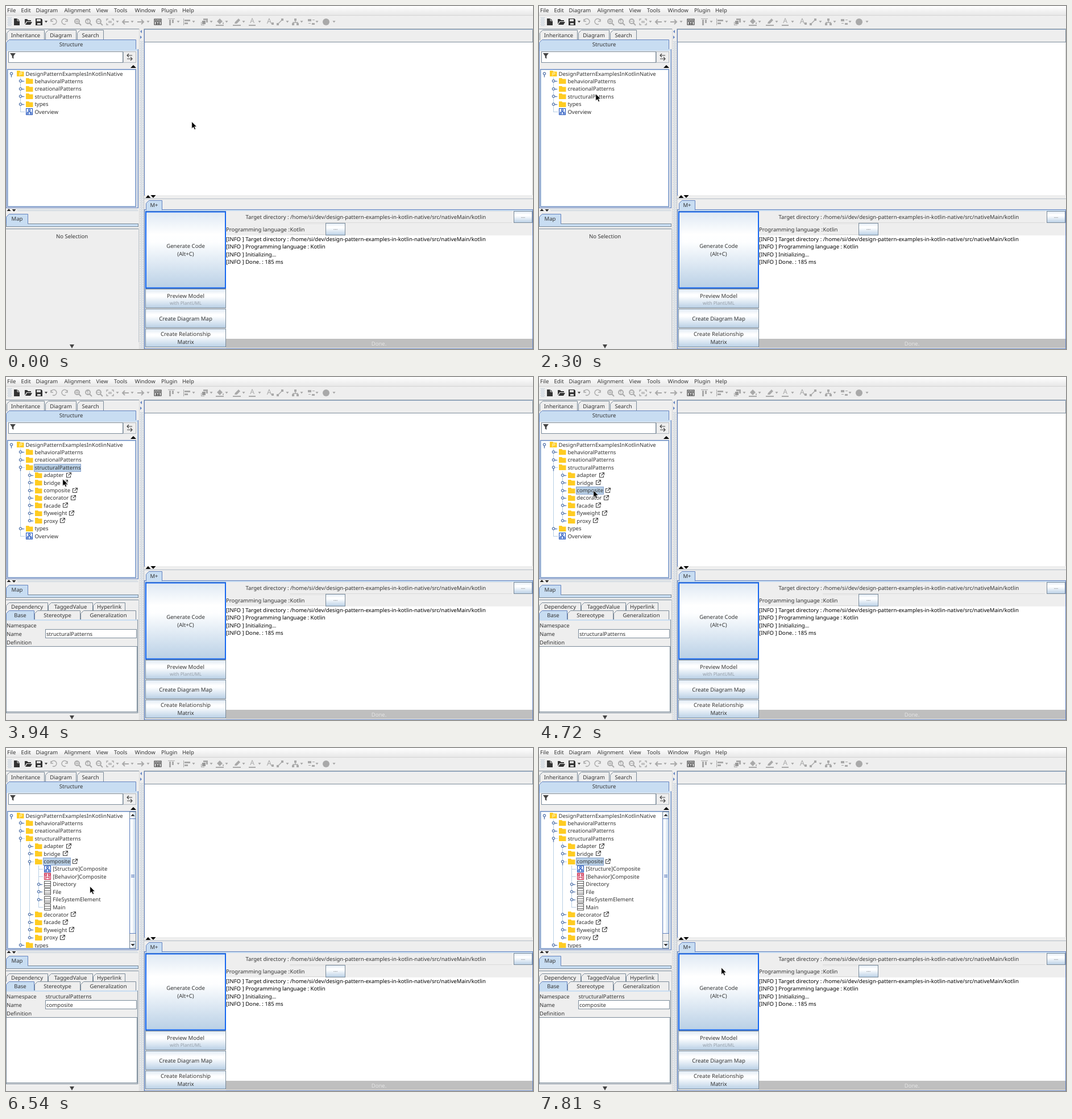
Write an HTML page with a canvas that moves like this. It is 927 by 604 pixels and loops after 8 s.

```html
<!DOCTYPE html>
<html>
<head>
<meta charset="utf-8">
<style>
html, body { margin: 0; height: 100%; overflow: hidden; background: #eee; }
canvas { display: block; }
</style>
</head>
<body>
<canvas id="c" width="927" height="604"></canvas>
<script>
const g = document.getElementById('c').getContext('2d');
const INK = '#333', EDGE = '#7a8a99', BLUE = '#6382bf', TAB = '#c8ddf2', SEL = '#b8cfe5', OFF = '#a9a9a9';
const ROW = 13.42, LOOP = 8000;

function rect(x, y, w, h, fill, edge) {
  if (fill) { g.fillStyle = fill; g.fillRect(x, y, w, h); }
  if (edge) { g.strokeStyle = edge; g.strokeRect(x + .5, y + .5, w - 1, h - 1); }
}
function text(s, x, mid, color = INK, align = 'left', size = 9.55) {
  g.font = size + 'px "Noto Sans", "Open Sans", sans-serif';
  g.textRendering = 'geometricPrecision';
  g.textAlign = align;
  g.fillStyle = color;
  g.fillText(s, x, mid + 3.5);
}
function shape(x, y, d, fill, edge, width = 1) {
  const p = new Path2D(d);
  g.save();
  g.translate(x, y);
  if (fill) { g.fillStyle = fill; g.fill(p); }
  if (edge) { g.strokeStyle = edge; g.lineWidth = width; g.stroke(p); }
  g.restore();
}
function sheen(x, y, w, h, edge = EDGE, across) {
  const q = across ? g.createLinearGradient(x, 0, x + w, 0) : g.createLinearGradient(0, y, 0, y + h);
  q.addColorStop(0, '#dde8f3');
  q.addColorStop(.3, '#fff');
  q.addColorStop(.4, '#fdfeff');
  q.addColorStop(1, SEL);
  rect(x, y, w, h, q, edge);
}
function button(label, x, y, w, h, edge) {
  sheen(x, y, w, h, edge);
  const lines = label.split('\n');
  lines.forEach((s, i) => text(s, x + w / 2, y + h / 2 + (i - (lines.length - 1) / 2) * 13.4, INK, 'center', 9.65));
}
function tab(label, x, y, w, h, on) {
  shape(x + .5, y + .5, `M0 ${h}V5L5 0H${w - 1}V${h}`, on ? TAB : '#eee', on ? BLUE : EDGE);
  text(label, x + w / 2, y + h / 2 + .3, INK, 'center');
}
const tri = (x, y, w, h, c = '#000') => shape(x, y, `M${-w / 2} 0H${w / 2}L0 ${h}z`, c);

function bumps(x, y, w, h) {
  for (let j = 0; j < h; j += 2)
    for (let i = j % 4 / 2; i < w; i += 2) {
      if ((i * 2 + j) % 4 === 0) rect(x + i, y + j, 1, 1, '#a3b8cc');
    }
}

function menuAndTools() {
  const m = g.createLinearGradient(0, 0, 0, 17);
  m.addColorStop(0, '#fff');
  m.addColorStop(1, '#e6e6e6');
  rect(0, 0, 927, 16, m);
  [['File', 2], ['Edit', 26.5], ['Diagram', 52.5], ['Alignment', 102.5], ['View', 158.5], ['Tools', 190],
   ['Window', 226.5], ['Plugin', 273], ['Help', 310]].forEach(([s, x]) => text(s, x, 7.7));
  rect(0, 16, 927, 1, '#d4d4d4');
  bumps(3, 20, 7, 16);

  const y = 28, fill = (x, d, c = OFF) => shape(x, y, d, c), line = (x, d, c = OFF, w = 1.4) => shape(x, y, d, 0, c, w);
  fill(19, 'M-5-6H1L5-2V6H-5z', INK);
  line(19, 'M1-6V-2H5', '#eee', 1);
  fill(39, 'M-6-5H-2L0-3H5V-1H-3L-6 4zM-2 0H7L4 5H-5z', INK);
  fill(58, 'M-6-6H4L6-4V6H-6z', INK);
  fill(58, 'M-4-5H3V-1H-4zM-3 2H3V5H-3z', '#ddd');
  line(84, 'M-5-5V-1H-1M-5-1A5 5 0 1 1-2 4');
  line(103, 'M5-5V-1H1M5-1A5 5 0 1 0 2 4');
  ['M-4-1H2M-1-4V2', 'M-3-2L-1-4V2', 'M-4-1H2'].forEach((d, i) => {
    line(126 + 19 * i, 'M3-1A4 4 0 1 1-5-1A4 4 0 1 1 3-1M2 2L6 6', OFF, 1.8);
    line(126 + 19 * i, d, OFF, 1);
  });
  line(183, 'M-6-2V-5H-3M3-5H6V-2M6 2V5H3M-3 5H-6V2');
  fill(183, 'M-3-2H3V2H-3z', '#c4c4c4');
  line(210, 'M6 0H-5M-1-4L-5 0L-1 4', OFF, 2);
  line(237, 'M-6 0H5M1-4L5 0L1 4', OFF, 2);
  line(267, 'M-6-5H6V5H-6zM-4-3H-1V0H-4zM1-3H4V0H1zM-4 3H4M-2 0V5M2 0V5', INK, 1.1);
  fill(291, 'M-6-6H6V-5H-6zM-4-4H-1V6H-4zM1-4H4V2H1z');
  fill(318, 'M-6-6H-5V6H-6zM-4-4H6V-1H-4zM-4 1H2V4H-4z');
  fill(349, 'M-2-6H6V1H3V-3H-2z');
  fill(349, 'M-4-2H2V4H-4z', '#999');
  fill(349, 'M-6 0H-5V5H0V6H-6z');
  fill(376, 'M-5-1L0-6L5-1L0 4zM6 0Q8 4 6 4Q4 4 6 0zM-7 5H7V7H-7z');
  fill(406, 'M-4 3L-3 0L3-6L6-3L0 3zM-7 5H7V7H-7z');
  text('A', 433, 26.5, OFF, 'center', 12);
  fill(433, 'M-6 5H6V7H-6z');
  text('A', 463, 27.5, OFF, 'center', 13);
  fill(468, 'M-1 1H3V5H-1z');
  line(482, 'M-4 4L4-4');
  fill(482, 'M-6 2H-2V6H-6zM2-6H6V-2H2z');
  line(509, 'M0-3V1M-4 3V1H4V3');
  fill(509, 'M-2-6H2V-2H-2zM-6 2H-2V6H-6zM2 2H6V6H2z');
  fill(537, 'M-6-5H0V-1H-6zM1 2H6V5H1zM-5 2H-1V3H-5zM2-4H6V-3H2z');
  shape(563, 28, 'M6 0A6 6 0 1 1-6 0A6 6 0 1 1 6 0', OFF);
  [70.5, 196, 222, 250, 303, 330, 361, 388, 418, 446, 495, 520, 547, 577].forEach((x, i) => tri(x, 26, 5, 3.5, i ? OFF : '#444'));
}

function frames() {
  rect(0, 40, 234, 1, EDGE);
  tab('Inheritance', 1, 42, 67, 18);
  tab('Diagram', 69, 42, 55, 18);
  tab('Search', 125, 42, 47, 18);
  rect(0, 76, 233, 280, '#eee', BLUE);
  tab('Structure', 0, 59, 229, 17, true);
  rect(1, 76, 231, 3, TAB);
  rect(231, 77, 1, 278, SEL);
  rect(4, 80, 202, 20, '#fff', EDGE);
  shape(12, 88, 'M-5-5H5L1.3 0V5L-1.3 3V0z', '#444');
  rect(206, 80, 23, 20, '#eee', '#b0b8c0');
  shape(217, 90, 'M5-3H-4M-1-6L-4-3L-1 0M-4 3H5M2 0L5 3L2 6', 0, '#444', 1.2);
  tri(224, 109, 10, -5);
  rect(2, 111, 227, 243, '#fff', BLUE);
  rect(3, 112, 225, 241, 0, SEL);

  bumps(20, 358, 212, 4);
  tri(5, 361, 7, -4, '#222');
  tri(14, 358, 7, 4, '#222');
  rect(0, 383, 233, 6, TAB, EDGE);
  tab('Map', 0, 366, 39, 17, true);
  rect(1, 383, 37, 2, TAB);
  rect(0, 392, 234, 1, EDGE);
  rect(233, 392, 1, 200, '#c4ccd4');
  tri(116, 596, 8, 7, '#444');

  rect(234, 40, 1, 564, '#d8d8d8');
  rect(242, 40, 1, 564, '#b4bcc6');
  bumps(236, 62, 5, 542);
  shape(236, 45, 'M3-3V3L0 0z', BLUE);
  shape(236, 55, 'M0-3V3L3 0z', BLUE);

  rect(243, 40, 684, 24, '#eee', EDGE);
  rect(243, 41, 684, 1, '#a9bdd6');
  rect(243, 64, 684, 269, '#fff');
  rect(243, 41, 1, 293, BLUE);
  rect(926, 64, 1, 269, '#ccc');
  tri(250, 338, 9, -5);
  tri(259, 333, 9, 5);
  rect(243, 339, 684, 1, '#b4bcc6');
}

function plugin() {
  rect(243, 358, 684, 246, '#eee', BLUE);
  rect(244, 359, 682, 2, TAB);
  rect(244, 359, 1, 244, TAB);
  tab('M+', 246, 342, 29, 17, true);
  rect(247, 359, 27, 2, TAB);
  button('Generate Code\n(Alt+C)', 245, 361, 142, 137, EDGE);
  g.lineWidth = 2;
  g.strokeStyle = '#1466f0';
  g.strokeRect(246, 362.5, 140, 134);
  g.lineWidth = 1;
  button('', 245, 498, 142, 34);
  text('Preview Model', 316, 510, INK, 'center', 9.65);
  text('with PlantUML', 316, 522, '#929ba5', 'center', 8.2);
  button('Create Diagram Map', 245, 533, 142, 34);
  button('Create Relationship\nMatrix', 245, 568, 142, 33);

  const path = '/home/si/dev/design-pattern-examples-in-kotlin-native/src/nativeMain/kotlin';
  rect(499, 361, 391, 1, '#e2e2e2');
  rect(499, 381, 391, 1, '#dadada');
  rect(499, 383, 62, 1, '#e2e2e2');
  rect(499, 402, 62, 1, '#dadada');
  text('Target directory :', 421.5, 371.4);
  text(path, 500, 371.4);
  text('Programming language :', 387, 393);
  text('Kotlin', 499.5, 393);
  sheen(893, 361, 33, 21);
  sheen(562, 382, 35, 22);
  text('...', 909.5, 369.5, '#777', 'center');
  text('...', 579.5, 390.5, '#777', 'center');
  rect(387, 404, 539, 182, '#fff');
  ['Target directory : ' + path, 'Programming language : Kotlin', 'Initializing...', 'Done. : 185 ms']
    .forEach((s, i) => text('[INFO ] ' + s, 387, 410.4 + 13.4 * i, '#000'));
  rect(387, 586, 539, 16, '#bfbfbf');
  text('Done.', 656, 594, '#e4e4e4', 'center');
}

function properties(space, name) {
  if (!name) return text('No Selection', 116, 405, INK, 'center');
  rect(0, 427, 232, 165, '#eee', EDGE);
  tab('Dependency', 0, 397, 74, 14);
  tab('TaggedValue', 74, 397, 79, 14);
  tab('Hyperlink', 153, 397, 57, 14);
  tab('Base', 0, 411, 50, 16, true);
  tab('Stereotype', 50, 411, 81, 16);
  tab('Generalization', 131, 411, 98, 16);
  rect(1, 427, 230, 2, TAB);
  text('Namespace', 1, 437);
  text(space, 69.5, 437);
  text('Name', 1, 452.3);
  rect(69, 444, 161, 16, '#fff', EDGE);
  text(name, 71, 452.3);
  text('Definition', 1, 467.3);
  rect(0, 474, 231, 116, '#fff', EDGE);
}

const ICONS = {
  folder(x, y) { shape(x, y, 'M0-5H5L6.5-3.5H12.5V5H0z', '#fc2'); },
  root(x, y) {
    ICONS.folder(x, y);
    shape(x, y, 'M5-1.5H9V1H5zM5 1V4', 0, '#fff4c0');
  },
  chart(x, y) {
    rect(x, y - 6, 12, 12, '#e8f0ff', '#1c4fb8');
    shape(x + 6, y, 'M-1.5-4H1.5V-1.5H-1.5zM0-1.5V.5M-3 2V.5H3V2M-4 2H-1.5V4H-4zM1.5 2H4V4H1.5z', 0, '#1c4fb8');
  },
  sequence(x, y) {
    rect(x, y - 6, 12, 12, '#fde8ee', '#c2183e');
    shape(x + 6, y, 'M-4-4H-1.5V-1.5H-4zM1.5-4H4V-1.5H1.5zM-3-1V5M3-1V5M-3 1.5H3', 0, '#c2183e');
  },
  class(x, y) {
    rect(x, y - 6, 12, 12, '#fff', '#555');
    rect(x, y - 2, 12, 1, '#555');
    rect(x, y + 2, 12, 1, '#555');
  }
};

// Each row: label, depth, icon, handle (0 none, 1 closed, 2 open), link mark
function treeRows(t) {
  const open = t >= 3060, deep = t >= 5140, dir = s => [s, 2, 'folder', 1, 1];
  const rows = [['DesignPatternExamplesInKotlinNative', 0, 'root', 2], ['behavioralPatterns', 1, 'folder', 1],
    ['creationalPatterns', 1, 'folder', 1], ['structuralPatterns', 1, 'folder', open ? 2 : 1]];
  if (open) {
    rows.push(dir('adapter'), dir('bridge'), ['composite', 2, 'folder', deep ? 2 : 1, 1]);
    if (deep) rows.push(['[Structure]Composite', 3, 'chart', 0], ['[Behavior]Composite', 3, 'sequence', 0],
      ['Directory', 3, 'class', 1], ['File', 3, 'class', 1], ['FileSystemElement', 3, 'class', 1], ['Main', 3, 'class', 0]);
    rows.push(...['decorator', 'facade', 'flyweight', 'proxy'].map(dir));
  }
  rows.push(['types', 1, 'folder', 1], ['Overview', 1, 'chart', 0]);
  return rows;
}

function tree(t) {
  const rows = treeRows(t), picked = t >= 4720 ? 'composite' : t >= 2830 ? 'structuralPatterns' : '';
  const rowY = i => 119 + ROW * i, knobX = d => 9.5 + 16 * d;
  g.save();
  g.beginPath();
  g.rect(3, 112, 225, 240);
  g.clip();
  rows.forEach(([, d], i) => {
    if (!d) return;
    let up = i - 1;
    while (rows[up][1] > d) up--;
    const y = Math.round(rowY(i)), top = Math.round(rowY(up)) + (rows[up][1] < d ? 7 : 0);
    rect(knobX(d) - .5, top, 1, y - top, SEL);
    rect(knobX(d) - .5, y, 8, 1, SEL);
  });
  rows.forEach(([label, depth, icon, knob, link], i) => {
    const mid = rowY(i), y = Math.round(mid), x = 34.5 + 15.9 * depth, k = knobX(depth);
    if (knob) {
      shape(k, y + .5, knob === 2 ? 'M0 1V6' : 'M1 0H6', 0, '#5878ad', 1.4);
      shape(k, y, 'M2.1 0A2.1 2.1 0 1 1-2.1 0A2.1 2.1 0 1 1 2.1 0', '#fff', '#5878ad', 1.3);
    }
    ICONS[icon](Math.round(x - 15.6), y);
    g.font = '9.55px "Noto Sans", "Open Sans", sans-serif';
    const w = g.measureText(label).width;
    if (label === picked) rect(Math.round(x - 1), Math.round(mid - 6.7), Math.round(w + 2), 14, SEL, BLUE + '88');
    text(label, x, mid);
    if (link) shape(Math.round(x + w + 4) + .5, y - .5, 'M3-3H0V4H7V1M4-4H8V0M8-4L3 1', 0, '#444', 1.1);
  });
  g.restore();
  if (t < 5140) return;
  rect(217, 112, 12, 241, '#eee', EDGE);
  sheen(217, 112, 12, 13, EDGE, true);
  sheen(217, 340, 12, 13, EDGE, true);
  sheen(217, 124, 12, 203, BLUE, true);
  tri(223, 120, 7, -4, INK);
  tri(223, 345, 7, 4, INK);
  for (let i = 0; i < 3; i++) rect(220, 223 + 2 * i, 6, 1, BLUE);
}

// Pointer path: time, x, y; it advances once every 80 ms
const PATH = [[920, 326, 203], [1640, 189, 182], [1800, 158, 172], [2280, 99, 154], [3540, 99, 154],
  [3940, 99, 179], [4420, 95, 199], [6050, 95, 199], [6530, 147, 243], [6930, 205, 299], [7810, 320, 386]];
function pointer(t) {
  const start = [6130, 3620, 1000, 0].find(s => t >= s);
  const s = start ? start + Math.floor((t - start) / 80) * 80 : 0;
  const n = PATH.findIndex(k => k[0] >= s);
  let [, x, y] = PATH[n < 0 ? PATH.length - 1 : n];
  if (n > 0) {
    const a = PATH[n - 1], u = (s - a[0]) / (PATH[n][0] - a[0]);
    x = a[1] + (x - a[1]) * u;
    y = a[2] + (y - a[2]) * u;
  }
  shape(Math.round(x) + .8, Math.round(y) + .8, 'M0 0V12L2.8 9.4L4.8 13.8L6.8 13L4.9 8.7H8.6z', '#000', '#fff', .6);
}

function draw(now) {
  const t = now % LOOP;
  g.lineWidth = 1;
  rect(0, 0, 927, 604, '#eee');
  menuAndTools();
  frames();
  plugin();
  properties(t >= 4810 ? 'structuralPatterns' : '', t >= 4810 ? 'composite' : t >= 2830 ? 'structuralPatterns' : '');
  tree(t);
  pointer(t);
  requestAnimationFrame(draw);
}
requestAnimationFrame(draw);
</script>
</body>
</html>
```
